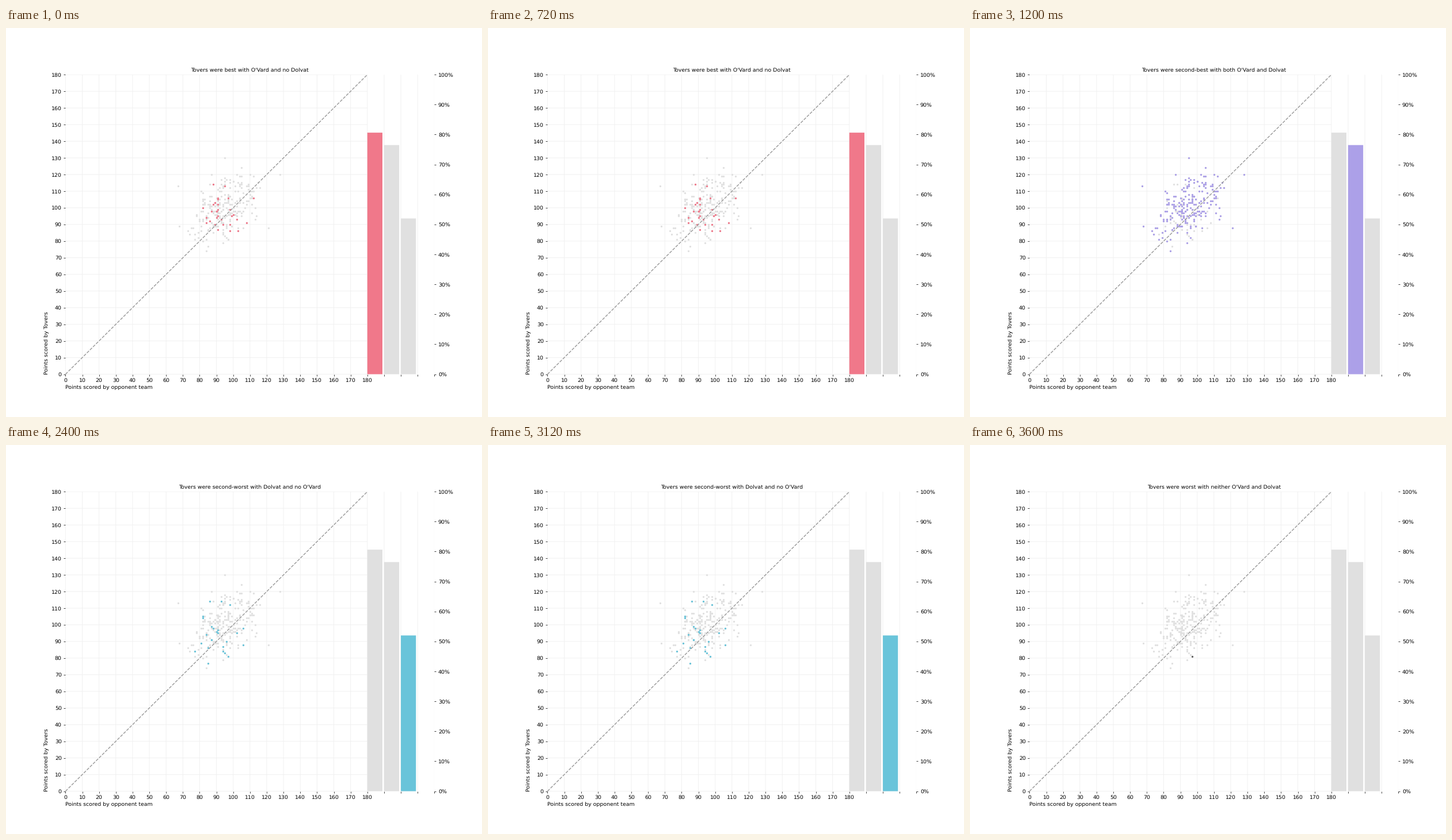
These frames come from a looping animation (827x677 px, 4.8 s). A matplotlib script:

```python
import matplotlib.pyplot as plt
import numpy as np
from matplotlib.animation import FuncAnimation
from matplotlib.ticker import PercentFormatter

WIDTH, HEIGHT, DPI = 827, 677, 67.7
TEAM, CENTER, GUARD = "Tovers", "O'Vard", "Dolvat"
GREY, PINK, PURPLE, BLUE, DARK = "#e0e0e0", "#f0788a", "#aca0e8", "#69c4da", "#606060"

# Unhinted text and unsnapped paths give soft, evenly spaced lines
plt.rcParams.update({"font.family": "DejaVu Sans", "font.size": 10,
                     "text.hinting": "no_hinting", "path.snap": False})


def games(count, mean, spread, tilt, reach, seed):
    """Whole-number (opponent, team) scores from a tilted normal cloud."""
    rng = np.random.default_rng(seed)
    u, v = rng.normal(size=(2, 4 * count))
    near = np.hypot(u, v) < reach
    u, v = u[near][:count], v[near][:count]
    v = tilt * u + np.sqrt(1 - tilt**2) * v
    return np.round(np.column_stack([u, v]) * spread + mean)


extremes = [(67, 113), (68, 89), (84, 74), (95, 130), (128, 120), (121, 88)]
center_only = games(31, (93, 98), (10, 10), 0.25, 2.1, seed=3)
both = np.vstack([games(198, (95, 102), (10, 10.5), 0.4, 2.5, seed=8), extremes])
guard_only = games(25, (92, 94), (8.5, 10.5), 0, 2.2, seed=5)
neither = np.array([(97, 81)])

scenes = [
    (f"{TEAM} were best with {CENTER} and no {GUARD}", center_only, PINK),
    (f"{TEAM} were second-best with both {CENTER} and {GUARD}", both, PURPLE),
    (f"{TEAM} were second-worst with {GUARD} and no {CENTER}", guard_only, BLUE),
    (f"{TEAM} were worst with neither {CENTER} and {GUARD}", neither, DARK),
]
all_games = np.vstack([points for _, points, _ in scenes])

# The small margin keeps the canvas from rounding down by a pixel
fig, ax = plt.subplots(figsize=((WIDTH + 0.01) / DPI, (HEIGHT + 0.01) / DPI), dpi=DPI)
ax.set(xlim=(0, 220), ylim=(0, 180))
x_ticks, y_ticks = range(0, 221, 10), range(0, 181, 10)
ax.set_xticks(x_ticks, [str(t) if t <= 180 else "" for t in x_ticks])
ax.set_yticks(y_ticks)
ax.set_xlabel("Points scored by opponent team", loc="left")
ax.set_ylabel(f"Points scored by {TEAM}", loc="bottom")
title = ax.set_title("", fontsize=10)

grid = dict(color="#f0f0f0", lw=1, zorder=0)
ax.vlines(x_ticks, 0, 180, **grid)
ax.hlines(y_ticks, 0, 180, **grid)
ax.plot([0, 180], [0, 180], "--", color="#999999", lw=1.5, zorder=3)

dots = dict(s=12, linewidths=0)
ax.scatter(*all_games.T, color=GREY, zorder=1, **dots)
highlight = ax.scatter([], [], zorder=2, **dots)

rates = ax.twinx()
rates.set_ylim(0, 1)
rates.set_yticks(np.linspace(0, 1, 11))
rates.yaxis.set_major_formatter(PercentFormatter(1, decimals=0))
bars = rates.bar([180, 190, 200], [25 / 31, 0.765, 0.52], width=9, align="edge")

for axes in (ax, rates):
    axes.spines[:].set_visible(False)


def update(frame):
    text, points, color = scenes[frame]
    title.set_text(text)
    highlight.set_offsets(points)
    highlight.set_facecolor(color)
    for i, bar in enumerate(bars):
        bar.set_facecolor(color if i == frame else GREY)
    return title, highlight, *bars


animation = FuncAnimation(fig, update, frames=len(scenes), interval=1200,
                          repeat=True, repeat_delay=0, blit=False)
plt.show()
```
